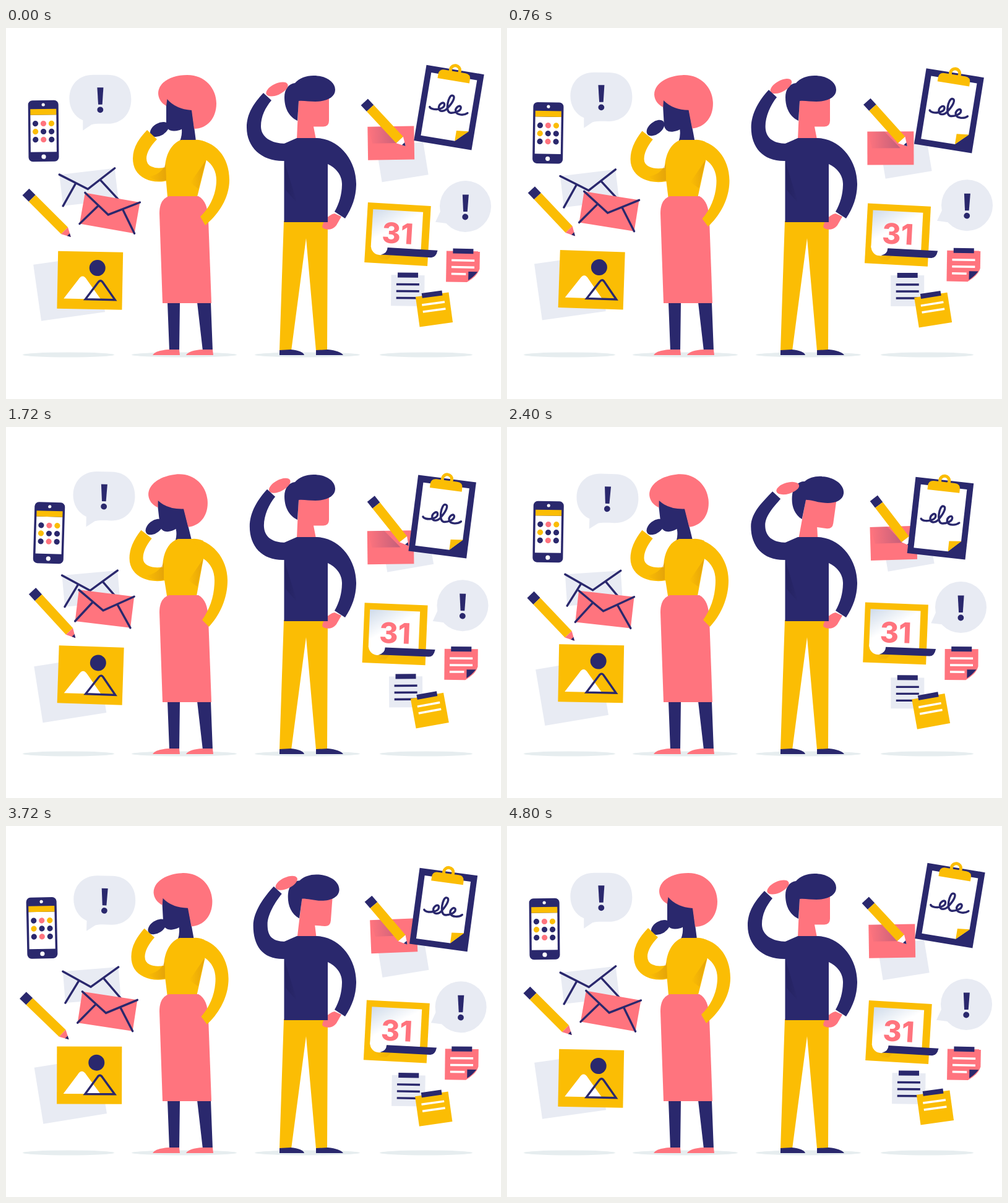
An HTML page for the animation above (4840 ms loop, 800 px wide and 600 px high).

```html
<!DOCTYPE html>
<html lang="en">
<head>
<meta charset="utf-8">
<title>Thinking it over</title>
<style>
  html, body { margin: 0; width: 100%; height: 100%; overflow: hidden; background: #fff; }
  svg { display: block; width: 100vw; height: 100vh; }
  .navy { fill: #2a286d; }
  .coral { fill: #ff747e; }
  .gold { fill: #fbbd04; }
  .mist { fill: #e8ebf3; }
  .white { fill: #fff; }
  .line { fill: none; stroke: #2a286d; stroke-width: 3.4; }
  .chalk { fill: none; stroke: #fff; stroke-width: 3.5; }
  .sleeve { fill: none; stroke: #fbbd04; stroke-width: 22; }
  .round { stroke-linecap: round; }
  .date { font: 800 46px Inter, "Open Sans", sans-serif; text-anchor: middle; }
</style>
</head>
<body>
<svg viewBox="0 0 800 600">
  <defs>
    <linearGradient id="fade"><stop offset="0" stop-color="#2a286d" stop-opacity="0"/><stop offset="1" stop-color="#2a286d" stop-opacity=".28"/></linearGradient>
    <linearGradient id="amber"><stop offset="0" stop-color="#c47f10" stop-opacity="0"/><stop offset="1" stop-color="#c47f10" stop-opacity=".4"/></linearGradient>
    <linearGradient id="dusk"><stop offset="0" stop-color="#14123f" stop-opacity=".3"/><stop offset="1" stop-color="#14123f" stop-opacity="0"/></linearGradient>
    <linearGradient id="page" x2=".4" y2=".5"><stop offset="0" stop-color="#cfdbea"/><stop offset="1" stop-color="#fff"/></linearGradient>
    <g id="pencil">
      <path class="navy" d="M-51.5-7.7H-37V7.7H-51.5Z"/>
      <path class="gold" d="M-37-7.7H37V7.7H-37Z"/>
      <path fill="currentColor" d="M37-7.7L51.5 0 37 7.7Z"/>
      <path class="navy" d="M46-3L51.5 0 46 3Z"/>
    </g>
    <g id="envelope">
      <path fill="currentColor" d="M-45-25.5H45V25.5H-45Z"/>
      <path class="line round" d="M-45-25.5L-2 3 45-25.5M-45 25.5L-20-9M45 25.5L20-9"/>
    </g>
    <g id="bang" class="navy">
      <path d="M-5-19H5L3.3 8.5H-3.3Z"/>
      <circle cy="17" r="4.9"/>
    </g>
    <path id="tab" class="navy" d="M-16.5-29H16.5V-21H-16.5Z"/>
    <path id="lines" d="M-18.5-10H18.5M-18.5 1H18.5"/>
  </defs>

  <g fill="#e6edef">
    <ellipse cx="101" cy="528.5" rx="74" ry="4"/>
    <ellipse cx="288" cy="528.5" rx="85" ry="4"/>
    <ellipse cx="487" cy="528.5" rx="85" ry="4"/>
    <ellipse cx="679" cy="528.5" rx="75" ry="4"/>
  </g>

  <!-- Floating things: home is x y angle, sway its amplitudes, phase (degrees) the peak of x and y. -->
  <g data-home="63.6 168 .2" data-sway="6 3.3 1.5" data-phase="120 117">
    <rect class="navy" x="-24.5" y="-49.5" width="49" height="99" rx="7"/>
    <path class="white" d="M-21-26H21V34H-21Z"/>
    <path class="gold" d="M-21-35.5H21V-26H-21Z"/>
    <circle class="white" cy="-42.5" r="2.6"/>
    <circle class="white" cy="41.7" r="3.6"/>
    <g id="apps"></g>
  </g>
  <g data-home="157.4 115.3 1" data-sway="5.7 4.7 1" data-phase="208 270">
    <path class="mist" d="M-50-1C-50-24-34-39.5-12-39.5H12C34-39.5 50-24 50 0 50 24 34 39.5 12 39.5 2 39.5-8 39-14 41L-28 50.5V34C-42 28-50 14-50-1Z"/>
    <use href="#bang"/>
  </g>
  <g color="#e8ebf3" data-home="137.2 259 -5.2" data-sway="3.9 2.4 1.7" data-phase="213 136">
    <use href="#envelope"/>
  </g>
  <g color="#ff747e" data-home="162.8 297.2 8.2" data-sway="4.9 3.1 1.8" data-phase="355 313">
    <use href="#envelope"/>
  </g>
  <g data-home="103.6 425 -8.8" data-sway="1.8 5.4 -.9" data-phase="213 222">
    <path class="mist" d="M-52-46H52V46H-52Z"/>
  </g>
  <g data-home="135.8 403.6 1.1" data-sway="1.1 4.9 1" data-phase="90 14">
    <path class="gold" d="M-52.5-46.5H52.5V46.5H-52.5Z"/>
    <circle class="navy" cx="11.5" cy="-20.5" r="13"/>
    <path class="white" d="M-42 30L-19-1Q-12-12-5-1L18 30Z"/>
    <path class="line" d="M-7 30.5L13 3Q17-3 21 3L41 30.5Z"/>
  </g>
  <g color="#ff747e" data-home="71 305 45.7" data-sway="6.7 6.1 1.8" data-phase="113 236">
    <use href="#pencil"/>
  </g>

  <g data-home="644.7 208.6 -9.5" data-sway="4.6 8.3 -.4" data-phase="147 343">
    <path class="mist" d="M-38-27H38V27H-38Z"/>
  </g>
  <g data-home="623.5 187 -1.3" data-sway="3.7 9.3 -1.2" data-phase="250 95">
    <path class="coral" d="M-37.5-27H37.5V27H-37.5Z"/>
    <path fill="url(#fade)" d="M-37-27H-10L16 0H-30Z"/>
  </g>
  <g color="#fff" data-home="617.4 154.6 49.8" data-sway="5 .7 2.8" data-phase="185 0">
    <use href="#pencil" transform="scale(.945 1)"/>
  </g>
  <g data-home="708.2 138.1 7.9" data-sway="8.1 9.6 1.6" data-phase="17 173">
    <path class="navy" d="M-47.2-62H47.2V62H-47.2Z"/>
    <path class="white" d="M-37.500-51H37.500V33L18 52H-37.500Z"/>
    <path class="gold" d="M18 52L38 33 18 35Z"/>
    <path class="gold" d="M-26-44V-50Q-26-59-17-59H17Q26-59 26-50V-44Z"/>
    <circle cy="-61" r="7.7" fill="none" stroke="#fbbd04" stroke-width="5"/>
    <path class="line round" d="M-31 4C-27 10-7 5-8-3-9-10-18-3-16 4-14 10-6 8-2 1 4-8 9-20 2-20-4-20-6 7 3 8 9 8 20 3 19-3 17-9 9-1 12 5 15 10 26 9 31 4"/>
  </g>
  <g data-home="738 290 .7" data-sway="5.8 3.3 .4" data-phase="39 243">
    <circle class="mist" r="41.5"/>
    <path class="mist" d="M-40 8L-48 26-30 28Z"/>
    <use href="#bang"/>
  </g>
  <g data-home="630.5 333.7 2.8" data-sway="2.5 1.2 .6" data-phase="350 100">
    <path class="gold" d="M-51-48.5H51V48.5H-51Z"/>
    <path fill="url(#amber)" d="M-36 33H-6L-14 42H-24Z" opacity=".5"/>
    <path fill="url(#page)" d="M-42-38H39V23H-42Z"/>
    <circle class="white" cx="-27.5" cy="21" r="14.3"/>
    <path class="navy" d="M-15 22.5H66Q64 34.5 56 34.5H-25Q-15 32-15 22.5Z"/>
    <text class="date coral" y="15">31</text>
  </g>
  <g data-home="736.5 385 .7" data-sway="2 1 .3" data-phase="10 330">
    <path class="coral" d="M-27-25H27V3Q25 10 20 15T7 25H-27Z"/>
    <path class="navy" d="M9 8H24Q17 17 9 22Z"/>
    <use href="#tab"/>
    <use href="#lines" class="chalk"/>
    <path class="chalk" d="M-18.5 12H5"/>
  </g>
  <g data-home="648.3 427.5 .3" data-sway="2.2 3.1 .6" data-phase="297 202">
    <path class="mist" d="M-27-25H27V25H-27Z"/>
    <use href="#tab"/>
    <use href="#lines" class="line"/>
    <path class="line" d="M-18.5 12H18.5"/>
  </g>
  <g data-home="688.6 457.6 -9" data-sway="4 2.2 1.4" data-phase="328 190">
    <path class="gold" d="M-27-24.5H27V24.5H-27Z"/>
    <use href="#tab"/>
    <use href="#lines" class="chalk"/>
  </g>

  <!-- woman -->
  <path class="navy" d="M261 444H281L280 522H264ZM309 444H331L334 522H318Z"/>
  <path class="coral" d="M237 529Q241 521 264 520H280L281 529ZM291 529Q296 521 318 520H334L335 529Z"/>
  <g id="herHead">
    <path class="navy" d="M259 112V155Q260 167 272 166.5 280 166 284 163.5 285 173 281 183H307L299 120Z"/>
    <path class="coral" d="M259 126C250 121 246 113 246 105 247 87 268 76 293 76 322 76 340 98 340 122 340 146 325 163 304 163L300 133Q274 131 260.5 115Z"/>
  </g>
  <ellipse class="navy" id="herHand" rx="16.5" ry="10"/>
  <path class="gold" data-lean="M278 181 C262 186 253 205 253 228 L260 273 H308 L319 213 L319 184 Q308 180 301 181 Z" d="M283 181 C268 186 257 205 257 228 L261 273 H309 L324 213 L322 184 Q312 180 305 181 Z"/>
  <path class="sleeve" data-reach="M257 237 C234 241 210.5 234 210.5 212 C210.5 198 217 186 227 173.5" d="M260 236 C237 241 216 233 216 211 C216 196 225 184 236 172.5"/>
  <path fill="url(#amber)" data-lean="M319 213 L309 258 Q297 250 295 248 Z" d="M323 214 L311 260 Q300 252 298 250 Z"/>
  <path fill="url(#amber)" data-lean="M226 240 Q246 238 255 219 L255 247 Q238 250 226 240 Z" d="M230 240 Q250 238 258 220 L259 246 Q242 250 230 240 Z"/>
  <path class="coral" d="M263 272C253 276 248 284 248 300L253 445H332L327 310C326 290 322 278 311 272Z"/>
  <path class="gold" data-lean="M301 181 C332 182 358 212 358 248 C358 278 345 305 328 323 L317 312 C330 294 337 272 337 248 C337 232 330 220 319 213 Z" d="M305 181 C338 182 361 208 361 246 C361 275 343 302 322 319 L314 305 C330 290 340 268 340 246 C340 232 334 221 323 213 Z"/>

  <!-- man -->
  <path class="gold" d="M449 312H520L519 522H501L485 340 461 522H442Z"/>
  <path class="navy" d="M442 529V521L460 520Q480 522 482 529ZM501 529V521L520 520Q540 522 545 529Z"/>
  <path class="coral" d="M531 300C521 302 512 312 511 322 516 328 528 327 534 319L542 305Z"/>
  <g id="hisHead">
    <path class="coral" d="M473 112H522V150Q522 159 513 159.5H497L501 180H470Z"/>
    <path class="navy" d="M471 150C456 143 450 128 450 112 450 99 457 90 467 89 474 81 485 77 497 77 517 77 532 87 532 100 532 112 518 119 500 119 490 119 480 117 473 118Z"/>
  </g>
  <path class="navy" d="M449.500 314V187L470 178H503C540 180 566 215 566 252 566 272 560 290 548 308L531 297C539 283 543 268 543 252 543 238 533 226 520 220V314Z"/>
  <ellipse class="coral" id="hisHand" rx="19" ry="9"/>
  <path class="navy" id="hisArm"/>
  <path fill="url(#dusk)" d="M450 216L471 284 452 262Z"/>
</svg>
<script>
const LOOP = 4840, STEP = 40, CYCLE = 4800;
const $ = id => document.getElementById(id);
const all = key => [...document.querySelectorAll(`[data-${key}]`)];
const nums = s => s.split(' ').map(Number);

const mix = (a, b, k) => a + (b - a) * k;
const wave = (t, peak) => Math.cos(2 * Math.PI * t / CYCLE - peak * Math.PI / 180);
const ease = (t, a, b) => {
  const u = Math.min(1, Math.max(0, (t - a) / (b - a)));
  return u * u * (3 - 2 * u);
};
// Rises from a to b; every change of pose relaxes together late in the loop.
const hold = (t, a, b) => ease(t, a, b) - ease(t, 3250, 4150);
const place = (el, x, y, r) => el.setAttribute('transform', `translate(${x} ${y}) rotate(${r})`);

function morph(el, to) {
  const from = el.getAttribute('d'), end = to.match(/[\d.]+/g);
  return k => {
    let i = 0;
    el.setAttribute('d', from.replace(/[\d.]+/g, n => mix(+n, +end[i++], k)));
  };
}

function drift(el) {
  const [x, y, r] = nums(el.dataset.home), [dx, dy, dr] = nums(el.dataset.sway);
  const [px, py] = nums(el.dataset.phase);
  return t => {
    const side = wave(t, px);
    place(el, x + dx * side, y + dy * wave(t, py), r + dr * side);
  };
}

const dots = ['navy', 'coral', 'gold', 'gold', 'navy', 'navy', 'navy', 'coral', 'navy'];
$('apps').innerHTML = dots.map((c, i) =>
  `<circle class="${c}" cx="${i % 3 * 13 - 13}" cy="${Math.floor(i / 3) * 13 - 12}" r="4.6"/>`).join('');

const floats = all('home').map(drift);
const body = all('lean').map(el => morph(el, el.dataset.lean));
const arm = all('reach').map(el => morph(el, el.dataset.reach));

function drawWoman(t) {
  const lean = hold(t, 260, 1260), reach = hold(t, 60, 800);
  body.forEach(f => f(lean));
  arm.forEach(f => f(reach));
  $('herHead').setAttribute('transform', `translate(${-7.5 * lean} 0) rotate(${-6.5 * lean} 293 181)`);
  place($('herHand'), mix(248, 240, reach), mix(164, 161.5, reach), mix(-30, -38, reach));
}

function drawMan(t) {
  const turn = hold(t, 1700, 2600);
  const scratch = (1 - Math.cos(4 * Math.PI * t / CYCLE)) / 2;
  $('hisHead').setAttribute('transform', `translate(${2 * turn} ${turn}) rotate(${9 * turn} 486 178)`);
  place($('hisHand'), 438 + 7 * scratch + 18 * turn, 99 - 7 * scratch, -25 - 5 * scratch + 10 * turn);

  const e = 389 + 8 * scratch + 6 * turn;
  const x = 416 + 10 * scratch + 15 * turn, y = 105 - 7 * scratch - turn;
  $('hisArm').setAttribute('d', `M452 215C415 217 ${e} 194 ${e} 161C${e} 138 ${x - 15} ${y + 16} ${x} ${y}
    L${x + 13} ${y + 12}C${x + 3} ${y + 24} ${e + 23} 143 ${e + 23} 159C${e + 23} 176 428 187 452 187Z`);
}

function tick() {
  const t = Math.floor(performance.now() % LOOP / STEP) * STEP;
  floats.forEach(f => f(t));
  drawWoman(t);
  drawMan(t);
  requestAnimationFrame(tick);
}
tick();
</script>
</body>
</html>
```
